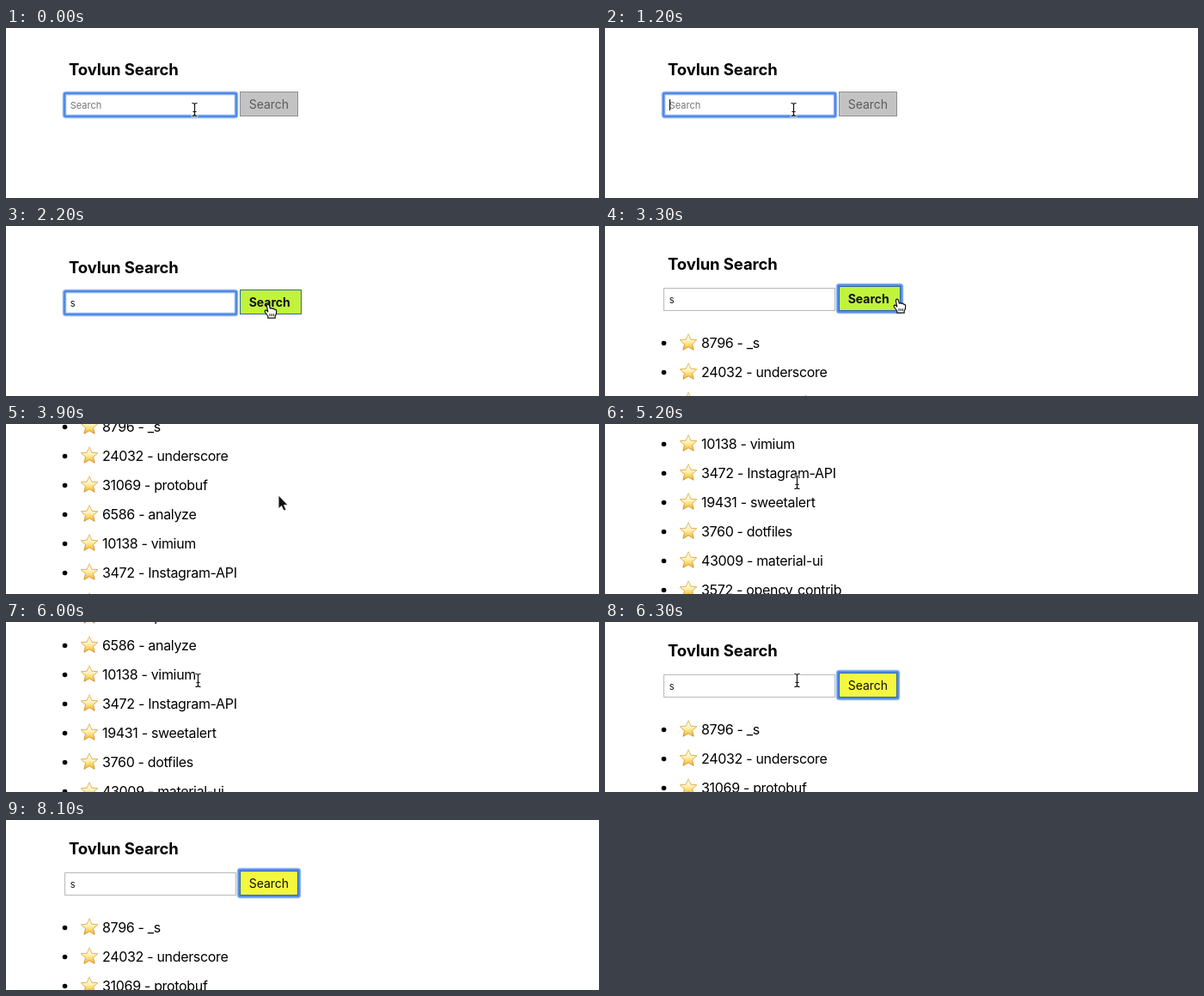
These frames come from a looping animation (690 by 198 pixels, 8.2 s). An HTML page:

```html
<!DOCTYPE html>
<html lang="en">
<head>
<meta charset="utf-8">
<title>Tovlun Search</title>
<style>
html, body { margin: 0; width: 100%; height: 100%; overflow: hidden; background: #fff; }
svg { display: block; width: 690px; height: 198px; font-family: Inter, "Open Sans", sans-serif; }
.title { font-size: 18.5px; font-weight: 700; letter-spacing: -.1px; }
.btn { font-size: 14px; }
.small { font-size: 11px; }
.row { font-size: 16px; letter-spacing: -.32px; }
.ring rect { fill: none; stroke: #4382e8; }
</style>
</head>
<body>
<svg viewBox="0 0 690 198">
  <defs>
    <linearGradient id="gold" x1="0" y1="0" x2="0" y2="1">
      <stop offset="0" stop-color="#fffbe6"/>
      <stop offset=".45" stop-color="#fff3bd"/>
      <stop offset=".75" stop-color="#fbd35a"/>
      <stop offset="1" stop-color="#f0b23a"/>
    </linearGradient>
    <linearGradient id="rim" x1="0" y1="0" x2="0" y2="1">
      <stop offset="0" stop-color="#e6c272"/>
      <stop offset="1" stop-color="#d4912f"/>
    </linearGradient>
  </defs>

  <g id="page">
    <text class="title" x="73" y="55">Tovlun Search</text>

    <rect x="68.5" y="76.5" width="199" height="26" fill="#fff" stroke="#b9b9b9"/>
    <g id="inputRing" class="ring"></g>
    <text id="query" class="small" x="74.7" y="94"></text>
    <rect id="caret" y="83" width="1" height="13"/>

    <g id="btnRing" class="ring"></g>
    <rect id="btnBox" x="272.5" y="74.5" height="28"/>
    <text id="btnText" class="btn" x="282.7" y="94">Search</text>

    <g id="list"></g>
  </g>

  <g id="cursor">
    <g id="beam" fill="none" stroke-linecap="square">
      <path d="M-2.5-7.5Q0-7.5 0-5.5V5.5Q0 7.5-2.5 7.5M2.5-7.5Q0-7.5 0-5.5M0 5.5Q0 7.5 2.5 7.5M-1.5 2.5H1.5" stroke="#fff" stroke-width="2.6"/>
      <path d="M-2.5-7.5Q0-7.5 0-5.5V5.5Q0 7.5-2.5 7.5M2.5-7.5Q0-7.5 0-5.5M0 5.5Q0 7.5 2.5 7.5M-1.5 2.5H1.5" stroke="#111" stroke-width="1.2"/>
    </g>
    <path id="arrow" d="M-.7-1V14.5L2.8 11.4L5.4 17L8.2 15.8L5.7 10.4H10.2Z" fill="#111" stroke="#fff" stroke-width=".8"/>
    <g id="hand" stroke="#111" stroke-width="1.2" stroke-linejoin="round">
      <path d="M-3.2 8.2V6L-6.5 1.5Q-7.5-.5-5.5-.8Q-4.2-.7-3.2 1L-4.6-5.8Q-4.7-7.8-3.2-7.9Q-1.9-7.8-1.5-6L-.7-2.8Q.8-4.1 1.9-2.5Q3.5-3.4 4.4-1.8Q6.4-2.1 6.7.2Q6.9 3.5 5.2 6V8.2Z" fill="#fff"/>
      <path d="M-1 3.2V6M1.2 3.2V6M3.4 3.2V6" fill="none" stroke-width="1"/>
    </g>
  </g>
</svg>

<script>
const LOOP = 8200, STEP = 100;
const $ = id => document.getElementById(id);
const set = (el, attrs) => { for (const k in attrs) el.setAttribute(k, attrs[k]); };
const show = (el, on) => { el.style.display = on ? "" : "none"; };

function add(parent, tag, attrs, text = "") {
  const el = document.createElementNS("http://www.w3.org/2000/svg", tag);
  set(el, attrs);
  el.textContent = text;
  parent.append(el);
  return el;
}

const repos = ["8796 - _s", "24032 - underscore", "31069 - protobuf", "6586 - analyze",
  "10138 - vimium", "3472 - Instagram-API", "19431 - sweetalert", "3760 - dotfiles",
  "43009 - material-ui", "3572 - opencv_contrib"];

const star = Array.from({ length: 10 }, (_, i) => {
  const r = i % 2 ? 4.7 : 10.3, a = (i / 5 - 0.5) * Math.PI;
  return (97 + r * Math.cos(a)).toFixed(1) + "," + (r * Math.sin(a)).toFixed(1);
}).join(" ");

repos.forEach((name, i) => {
  const row = add($("list"), "g", { transform: `translate(0 ${140 + 34 * i})` });
  add(row, "circle", { cx: 68.5, cy: 0.5, r: 2.8 });
  add(row, "polygon", { points: star, fill: "url(#gold)", stroke: "url(#rim)",
    "stroke-width": 1, "stroke-linejoin": "round" });
  add(row, "text", { class: "row", x: 112, y: 6 }, name);
});

// Soft focus outline: pairs of [stroke width, opacity]
function makeRing(group, x, y, h) {
  return [[5, 0.3], [3, 0.85]].map(([w, o]) =>
    add(group, "rect", { x, y, height: h, rx: 1.5, "stroke-width": w, "stroke-opacity": o }));
}
makeRing($("inputRing"), 68, 76, 27).forEach(r => set(r, { width: 200 }));
const btnRing = makeRing($("btnRing"), 271, 73, 31);

const scrollKeys = [[3200, 0], [3300, 4], [3400, 20], [3600, 70], [3800, 125], [4000, 148],
  [4200, 153], [4400, 153], [4700, 195], [5000, 242], [5200, 253], [5900, 253],
  [6000, 215], [6200, 45], [6300, 15]];
const cursorKeys = [[1800, 219.5, 95], [1900, 224, 103], [2000, 246, 123], [2100, 288, 108],
  [2200, 308, 99], [2400, 308, 99], [2600, 343, 93], [3700, 343, 93], [3800, 336, 88],
  [4200, 263, 72], [4500, 263, 72], [4800, 223.5, 68]];
const shapeKeys = [[0, "beam"], [2000, "arrow"], [2200, "hand"], [3500, "arrow"],
  [4800, "beam"], [7000, ""]];
const lookKeys = [[0, "off"], [1400, "ready"], [2200, "hover"], [3500, "ready"]];
const looks = {
  off: { fill: "#c3c3c3", stroke: "#8f8f8f", ink: "#5c5c5c", width: 67, weight: 400 },
  ready: { fill: "#f4f73f", stroke: "#34679f", ink: "#111", width: 67, weight: 400 },
  hover: { fill: "#c1f33d", stroke: "#2c6aa0", ink: "#111", width: 71, weight: 700 }
};

const latest = (keys, t) => keys.filter(k => k[0] <= t).pop()[1];

function tween(keys, t, col = 1) {
  const i = keys.findIndex(k => k[0] > t);
  if (i === 0) return keys[0][col];
  if (i < 0) return keys[keys.length - 1][col];
  const a = keys[i - 1], b = keys[i];
  return a[col] + (b[col] - a[col]) * (t - a[0]) / (b[0] - a[0]);
}

function draw(t) {
  const typed = t >= 1400, clicked = t >= 2400;
  const look = looks[latest(lookKeys, t)], shape = latest(shapeKeys, t);

  set($("page"), { transform: `translate(0 ${-Math.round(tween(scrollKeys, t))})` });
  $("query").textContent = typed ? "s" : "Search";
  set($("query"), { fill: typed ? "#111" : "#757575" });
  set($("caret"), { x: typed ? 81 : 75 });
  show($("caret"), typed ? t < 1900 : Math.floor((t + 300) / 500) % 2 === 1);

  show($("inputRing"), !clicked);
  show($("btnRing"), clicked);
  btnRing.forEach(r => set(r, { width: look.width + 3 }));
  set($("btnBox"), { fill: look.fill, stroke: look.stroke, width: look.width });
  set($("btnText"), { fill: look.ink, "font-weight": look.weight });
  show($("list"), t >= 2900);

  for (const id of ["beam", "arrow", "hand"]) show($(id), id === shape);
  set($("cursor"), { transform: `translate(${tween(cursorKeys, t)} ${tween(cursorKeys, t, 2)})` });
}

const start = performance.now();
function tick() {
  const t = (performance.now() - start) % LOOP;
  draw(Math.floor(t / STEP) * STEP);
  requestAnimationFrame(tick);
}
tick();
</script>
</body>
</html>
```
